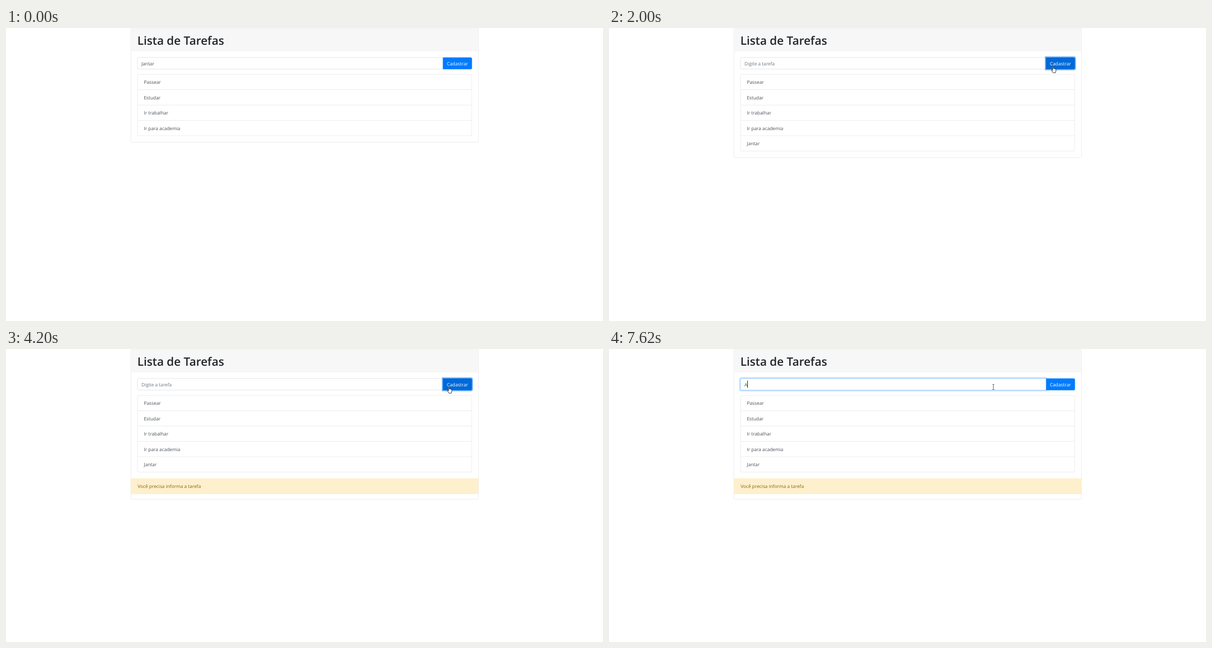
Recreate the animation shown at these times as an HTML page. Size 1067 px wide and 525 px high, loop 8000 ms.

```html
<!DOCTYPE html>
<html lang="pt-BR">
<head>
<meta charset="utf-8">
<title>Lista de Tarefas</title>
<style>
  * { box-sizing: border-box; }
  html, body { margin: 0; width: 100%; height: 100%; overflow: hidden; background: #fff; }
  /* The page is laid out at 1905px and shown scaled down. */
  #page {
    position: absolute; left: 0; top: 0; width: 1905px; height: 937px;
    transform: scale(.5601); transform-origin: 0 0;
    font: 14.85px/24px "Open Sans", "Noto Sans", sans-serif;
    color: #495057; text-rendering: geometricPrecision; white-space: nowrap;
  }
  .card {
    position: absolute; left: 398px; top: 0; width: 1110px;
    border: 1px solid #dfdfdf; border-radius: 4px; background: #fff;
  }
  .header {
    height: 73px; padding: 14.2px 20px 0; background: #f7f7f7;
    border-bottom: 1px solid #dfdfdf; border-radius: 3px 3px 0 0;
  }
  h1 { margin: 0; font-size: 37px; line-height: 48px; font-weight: 600; color: #212529; }
  .body { padding: 20px; }
  .group { display: flex; height: 38px; margin-bottom: 16px; }
  .input, .button { position: relative; padding: 6.8px 12px 0; border: 1px solid; }
  .input { flex: 1; border-color: #ced4da; border-radius: 4px 0 0 4px; background: #fff; }
  .input.focus { z-index: 3; border-color: #80bdff; box-shadow: 0 0 0 3.2px rgba(0, 123, 255, .25); }
  .button {
    width: 93px; margin-left: -1px; padding-left: 0; padding-right: 0; text-align: center;
    color: #fff; background: #007bff; border-color: #007bff; border-radius: 0 4px 4px 0;
  }
  .button.hover { background: #0069d9; border-color: #0062cc; }
  .button.active { background: #0062cc; border-color: #005cbf; }
  .button.focus { z-index: 3; box-shadow: 0 0 0 3.2px rgba(0, 123, 255, .5); }
  #caret { position: absolute; top: 6px; width: 1.5px; height: 23px; background: #333; }
  #hint { color: #6c757d; }
  .list { border: 1px solid #dfdfdf; border-radius: 4px; overflow: hidden; }
  .item { height: 49px; padding: 12.8px 20px 0; border-bottom: 1px solid #dfdfdf; }
  .item.last { height: 48px; border-bottom: 0; }
  .item.hover { background: #f8f9fa; }
  #alert {
    height: 50px; margin-bottom: 16px; padding: 12.8px 20px 0;
    color: #856404; background: #fef0cd; border: 1px solid #ffeeba;
  }
  [hidden] { display: none !important; }
  #overlay { position: absolute; left: 0; top: 0; }
  #overlay path { stroke-linejoin: round; }
</style>
</head>
<body>
<div id="page">
  <div class="card">
    <div class="header"><h1>Lista de Tarefas</h1></div>
    <div class="body">
      <div class="group">
        <div class="input" id="input"><span id="value"></span><i id="caret"></i><span id="hint">Digite a tarefa</span></div>
        <div class="button" id="button">Cadastrar</div>
      </div>
      <div class="list" id="list"></div>
    </div>
    <div id="alert">Você precisa informa a tarefa</div>
  </div>
</div>
<svg id="overlay" width="1067" height="525" viewBox="0 0 1067 525">
  <circle id="click" r="7" fill="#ffdc00" fill-opacity=".65"/>
  <path id="arrow" fill="#fff" stroke="#000" stroke-width=".6"
    d="M.3 .4V9.3L2.3 7.5L3.7 10.7L5 10.1L3.6 7H6.5Z"/>
  <path id="hand" fill="#fff" stroke="#111" stroke-width=".8"
    d="M3 1.2C3 .4 4.6 .4 4.6 1.2V4.8C5 4.3 6 4.4 6.1 5.1C6.6 4.7 7.4 4.9 7.5 5.5C8 5.2 8.8 5.5 8.8 6.3V9L8 12.2H3.6L.7 7.8C.3 7 1.2 6.5 1.8 7.1L3 8.3Z"/>
  <path id="beam" fill="none" stroke="#333" stroke-width=".8"
    d="M.3 .5H1.5L2 .9L2.5 .5H3.7M2 .9V9.1M.3 9.5H1.5L2 9.1L2.5 9.5H3.7"/>
</svg>
<script>
const LOOP = 8000;
const $ = id => document.getElementById(id);
const pointers = ['arrow', 'hand', 'beam'];

const tasks = ['Passear', 'Estudar', 'Ir trabalhar', 'Ir para academia', 'Jantar'];
const items = tasks.map(text => {
  const item = document.createElement('div');
  item.textContent = text;
  $('list').append(item);
  return item;
});

// Each step changes part of the state at its time and holds until the next one.
const steps = [
  [0, { value: 'Jantar', count: 4, hot: -1, button: '', focus: false, caret: false, alert: false, pointer: null, click: null }],
  [200, { pointer: ['arrow', 1025, 504] }],
  [400, { pointer: ['hand', 760, 181], hot: 3 }],
  [600, { pointer: ['hand', 757, 142], hot: 2 }],
  [800, { pointer: ['hand', 788, 68], hot: -1, button: 'hover' }],
  [1000, { pointer: ['hand', 790, 68] }],
  [2000, { value: '', count: 5, button: 'hover focus' }],
  [2400, { pointer: ['arrow', 461, 78], button: 'focus' }],
  [2600, { pointer: ['hand', 371, 121], hot: 1 }],
  [2800, { pointer: ['hand', 339, 124] }],
  [3000, { pointer: ['beam', 280, 65], hot: -1 }],
  [3200, { pointer: ['beam', 284, 58] }],
  [3400, { pointer: ['beam', 354, 62] }],
  [3600, { pointer: ['beam', 724, 65] }],
  [3800, { pointer: ['beam', 765, 64] }],
  [4000, { pointer: ['hand', 790, 69], button: 'active focus', click: [793, 69] }],
  [4200, { pointer: ['hand', 788, 67], button: 'hover focus', click: null, alert: true }],
  [4800, { pointer: ['beam', 689, 63], button: 'focus' }],
  [5020, { pointer: ['beam', 685, 63] }],
  [5420, { button: '', focus: true, caret: true, click: [686, 67] }],
  [5620, { click: null }],
  [6020, { caret: false }],
  [6420, { caret: true }],
  [7020, { caret: false }],
  [7620, { caret: true, value: 'A' }]
];

const show = (el, on) => { el.style.display = on ? '' : 'none'; };
const place = (el, x, y) => el.setAttribute('transform', `translate(${x} ${y})`);

function render(state) {
  $('value').textContent = state.value;
  $('hint').hidden = state.value !== '';
  $('caret').hidden = !state.caret;
  $('input').className = state.focus ? 'input focus' : 'input';
  $('button').className = 'button ' + state.button;
  $('alert').hidden = !state.alert;
  items.forEach((item, i) => {
    item.hidden = i >= state.count;
    item.className = 'item' + (i === state.count - 1 ? ' last' : '') + (i === state.hot ? ' hover' : '');
  });
  const [kind, x, y] = state.pointer || [];
  for (const name of pointers) show($(name), name === kind);
  if (kind) place($(kind), x, y);
  show($('click'), state.click);
  if (state.click) place($('click'), ...state.click);
}

const start = performance.now();
let current = -1;

function tick() {
  const time = (performance.now() - start) % LOOP;
  const past = steps.filter(([at]) => at <= time);
  if (past.length !== current) {
    current = past.length;
    render(Object.assign({}, ...past.map(([, change]) => change)));
  }
  requestAnimationFrame(tick);
}
tick();
</script>
</body>
</html>
```
